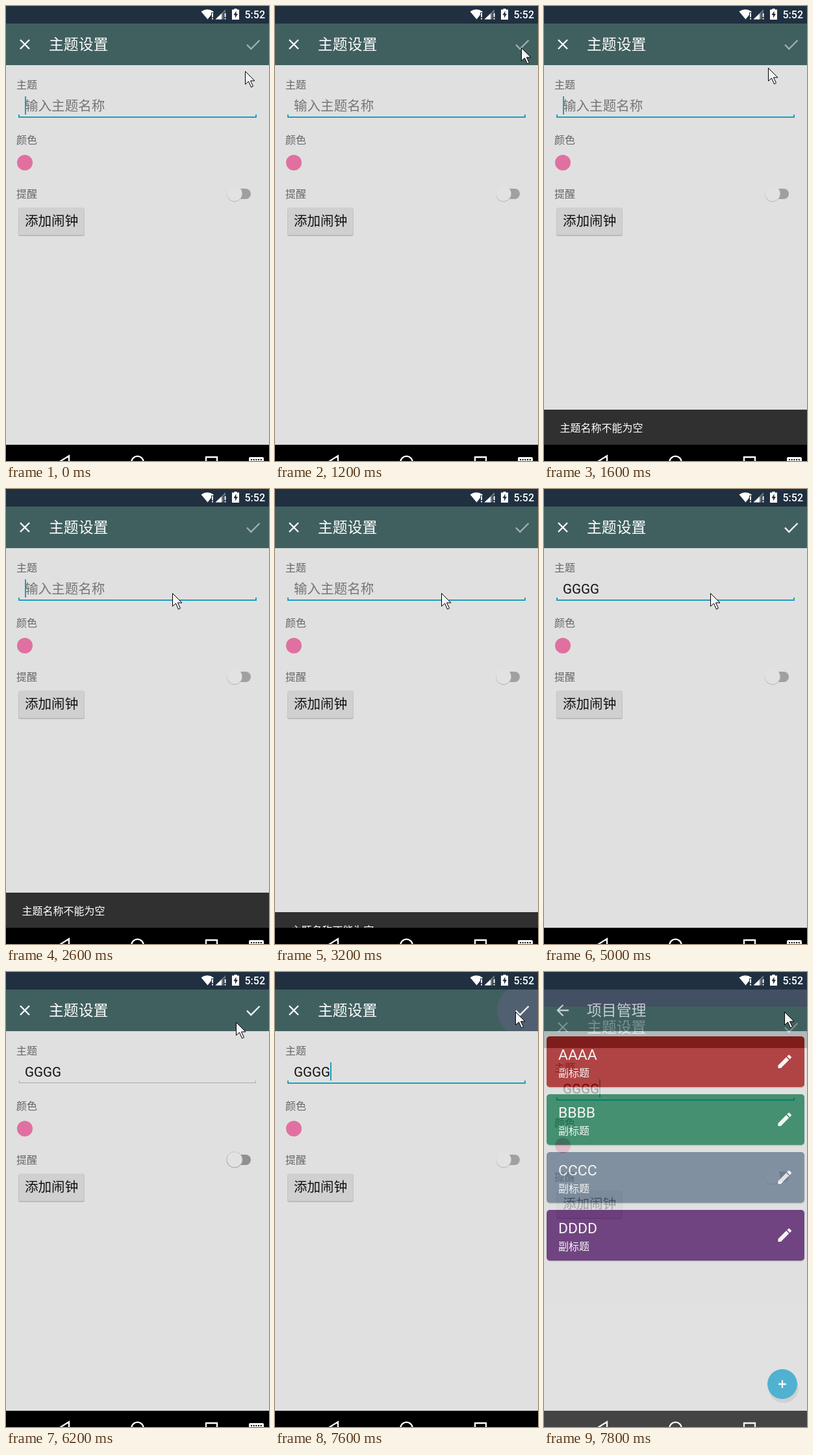
An HTML page that plays this animation: 405x700 px, repeating every 8000 ms.

```html
<!DOCTYPE html>
<html lang="zh-CN">
<head>
<meta charset="utf-8">
<title>主题设置</title>
<style>
html, body { margin: 0; width: 100%; height: 100%; overflow: hidden; background: #000; }
#stage { display: block; width: 405px; height: 700px; }
text { font-family: Roboto, "Noto Sans CJK SC", "Noto Sans CJK", sans-serif; white-space: pre; }
.title { font-size: 22.86px; fill: #fff; }
.field { font-size: 20.57px; fill: #111; }
.label { font-size: 16px; fill: #666; }
.small { font-size: 16px; fill: #fff; }
.line { fill: none; stroke: #fff; stroke-width: 2.3; }
</style>
</head>
<body>
<svg id="stage" viewBox="0 0 405 700">
  <defs>
    <path id="pencil" fill="#fff" transform="scale(1.143)" d="M3 17.25V21h3.75L17.81 9.94l-3.75-3.75zM20.71 7.04c.39-.39.39-1.02 0-1.41l-2.34-2.34c-.39-.39-1.02-.39-1.41 0l-1.83 1.83 3.75 3.75z"/>
  </defs>

  <g id="home">
    <rect width="405" height="675" fill="#e0e0e0"/>
    <rect width="405" height="91" fill="#40605f"/>
    <path class="line" d="M38 59H21M29.5 50.5L21 59l8.5 8.5"/>
    <text class="title" x="66" y="67">项目管理</text>
    <g id="cards"></g>
    <circle cx="369" cy="640" r="23" opacity=".1"/>
    <circle cx="367" cy="634" r="23" fill="#139cc9"/>
    <path class="line" d="M361 634h12M367 628v12"/>
  </g>

  <g id="nav">
    <rect y="675" width="405" height="25"/>
    <path class="line" d="M97 692v24L78 704zM308 717v-23h17v23"/>
    <circle class="line" cx="202.5" cy="702" r="9.3"/>
    <g id="keyboard">
      <rect x="374" y="694" width="23" height="16" rx="2" fill="#fff"/>
      <path d="M377 698h17M377 701.5h17" stroke="#000" stroke-width="2" stroke-dasharray="2 1.7"/>
    </g>
  </g>

  <g id="form">
    <rect width="405" height="27" fill="#4c2969"/>
    <rect y="27" width="405" height="648" fill="#e0e0e0"/>
    <rect y="27" width="405" height="64" fill="#40605f"/>
    <svg y="27" width="405" height="64"><circle id="ripple" cx="381" cy="32" r="39" fill="#506070"/></svg>
    <path class="line" d="M22 52l14 14M36 52l-14 14"/>
    <text class="title" x="66" y="67">主题设置</text>
    <path id="check" class="line" d="M371 59.5l6.3 6.5L390.500 52.800"/>

    <text class="label" x="16" y="127">主题</text>
    <text class="field" id="hint" x="29" y="161" style="fill:#757575">输入主题名称</text>
    <text class="field" id="typed" x="29" y="161"></text>
    <path id="underline" fill="none"/>
    <rect id="caret" y="139" width="2" height="28" fill="#1f9fbf"/>

    <text class="label" x="16" y="212">颜色</text>
    <circle cx="29" cy="241" r="12" fill="#e070a0"/>

    <text class="label" x="16" y="295">提醒</text>
    <rect id="track" x="345" y="281" width="32" height="16" rx="8"/>
    <circle id="shade" cx="352" r="12"/>
    <circle cx="352" cy="288.500" r="11.500" fill="#e2e2e2"/>

    <rect x="19" y="311" width="102" height="43" rx="3" fill="#b4b4b4"/>
    <rect x="19.500" y="310" width="101" height="42.500" rx="2.500" fill="#d0d0d0"/>
    <text class="field" x="29" y="338">添加闹钟</text>

    <svg y="621" width="405" height="54">
      <g id="snack">
        <rect width="405" height="54" fill="#303030"/>
        <text class="small" x="24.500" y="34">主题名称不能为空</text>
      </g>
    </svg>
  </g>

  <g id="status" fill="#fff">
    <rect width="405" height="27" fill="#203040"/>
    <path d="M300.500 8.500Q310 2 319.500 8.500V10H316v3.500L310.500 20.500z"/>
    <path d="M317 11h2v6h-2zM317 18.500h2v2h-2zM336.500 11h2v6h-2zM336.500 18.500h2v2h-2z"/>
    <path d="M338 5v5h-3v10.500h-12.500z" opacity=".35"/>
    <path d="M332 11.500v9h-9.500z"/>
    <path d="M351.500 4h4v1.500h3.500V21h-11V5.500h3.500z"/>
    <path d="M354.500 7.500l-4 6.500h2.500v4.500l4-6.500h-2.500z" fill="#203040"/>
    <text x="367.500" y="19" font-size="16" font-weight="500">5:52</text>
  </g>

  <path id="mouse" d="M.5.5v20l5-4.500 4 9 3-1.500-4-8.500h6.500z" fill="#f4f4f4" stroke="#000"/>
</svg>
<script>
const $ = id => document.getElementById(id);
const set = (id, attrs) => { for (const k in attrs) $(id).setAttribute(k, attrs[k]); };
const show = (id, on) => set(id, { visibility: on ? "visible" : "hidden" });

const LOOP = 8000, STEP = 200;

const cards = [["AAAA", "#9b0000"], ["BBBB", "#006e40"], ["CCCC", "#576e85"], ["DDDD", "#400057"]];
$("cards").innerHTML = cards.map(([name, color], i) => `
  <g transform="translate(0 ${99 + 89 * i})">
    <rect x="4" y="1" width="397" height="78.500" rx="5" opacity=".2"/>
    <rect x="4" width="397" height="78" rx="5" fill="${color}"/>
    <text class="title" x="22" y="36">${name}</text>
    <text class="small" x="22" y="62">副标题</text>
    <use href="#pencil" x="357" y="25"/>
  </g>`).join("");

// Each row: start time, then the value held until the next row.
const mousePath = [
  [0, 368, 100], [200, 376, 92], [400, 385, 78], [600, 389, 66], [800, 386, 62], [1000, 382, 63],
  [1200, 379, 64], [1400, 376, 68], [1600, 345, 95], [1800, 285, 140], [2000, 256, 160],
  [6200, 354, 77], [6400, 365, 66], [6600, 370, 61]
];
const snackDrop = [[0, 54], [1400, 24], [1600, 0], [3200, 30], [3400, 54]];
const typing = [[0, 0], [3800, 1], [4000, 2], [4200, 3], [4400, 4]];
const held = (rows, t) => rows.filter(row => row[0] <= t).pop().slice(1);

function caretOn(t, focused) {
  if (!focused) return false;
  if (t >= 7200) return true;
  if (t >= 3800) return t < 5000;
  return (t + 450) % 1000 < 500;
}

function draw(time) {
  const t = Math.floor(time / STEP) * STEP;
  const focused = t < 5200 || t >= 7200;
  const leaving = t >= 7800;
  const [count] = held(typing, t);

  $("typed").textContent = "G".repeat(count);
  show("hint", !count);
  show("caret", caretOn(t, focused));
  set("caret", { x: 29 + 14 * count });
  set("check", { opacity: count ? 1 : 0.5 });
  set("underline", focused
    ? { d: "M20 167v4h365v-4", stroke: "#1f9fbf", "stroke-width": 2 }
    : { d: "M20.5 167v3.5h364V167", stroke: "#a8a8a8", "stroke-width": 1 });

  set("track", { fill: focused ? "#a0a0a0" : "#909090" });
  set("shade", focused ? { cy: 289.5, fill: "#b8b8b8" } : { cy: 289, r: 12.5, fill: "#b0b0b0" });
  if (focused) set("shade", { r: 11.7 });

  set("snack", { transform: `translate(0 ${held(snackDrop, t)[0]})` });
  set("mouse", { transform: `translate(${held(mousePath, t).join(" ")})` });
  show("keyboard", t < 7400);
  show("ripple", t === 7600);
  set("form", { opacity: leaving ? 0.3 : 1, transform: `translate(0 ${leaving ? 26 : 0})` });
}

const start = performance.now();
function tick() {
  draw((performance.now() - start) % LOOP);
  requestAnimationFrame(tick);
}
tick();
</script>
</body>
</html>
```
